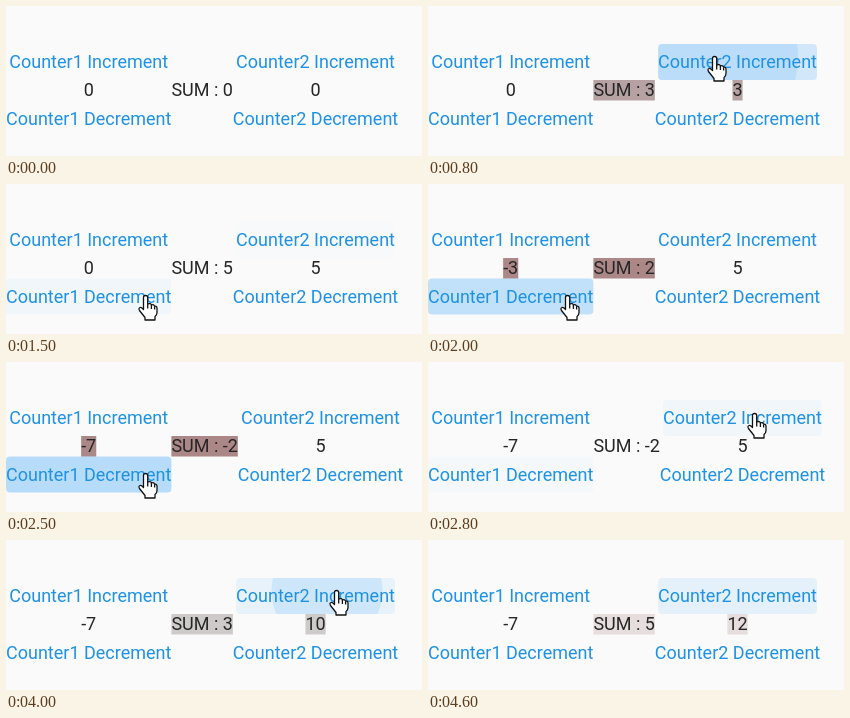
An HTML page with a canvas for the animation above (4.7 s loop, 416 by 150 pixels).

```html
<!DOCTYPE html>
<html lang="en">
<head>
<meta charset="utf-8">
<title>Two counters and their sum</title>
<style>
  html, body { margin: 0; width: 100%; height: 100%; overflow: hidden; background: #fafafa; }
  canvas { display: block; }
</style>
</head>
<body>
<canvas id="stage" width="416" height="150"></canvas>
<script>
const ctx = document.getElementById('stage').getContext('2d');
const LOOP = 4700, STEP = 100;
const BLUE = '33,150,243';
const ROW = { inc: 38, num: 74, dec: 94.5 };
const BTN_H = 36;

// Click times per button
const clicks = {
  dec1: [1550, 1700, 1850, 2020, 2130, 2240, 2350],
  inc2: [400, 550, 700, 880, 1030, 2880, 3050, 3320, 3600, 3950, 4090, 4230]
};

// Pointer tip: time, x, y
const path = [
  [100, 300, 6], [200, 310, 85], [300, 287, 51], [1000, 287, 51],
  [1100, 170, 80], [1200, 52, 94], [1300, 90, 113], [1400, 140, 112],
  [2500, 140, 112], [2600, 230, 85], [2700, 322, 54], [2800, 327, 52],
  [3900, 331, 51], [4700, 331, 51]
];
const SHOW = 100, HIDE = 4500;

const hand = new Path2D('M-2.5 1.5 Q-2.5 -.5 -.5 -.5 Q1.7 -.5 1.7 1.5 V8 ' +
  'Q4.8 6.8 5.4 9 Q8 8 8.6 10.2 Q11 9.6 11 12.3 V16.5 Q11 19 9 20.5 V24 H-1 V21.5 ' +
  'L-6.5 14.5 Q-7.8 12.2 -6 11.5 Q-4.7 11.1 -2.5 13.5 Z');
const creases = new Path2D('M1.7 8 V12.5 M5.4 9 V13 M8.6 10.2 V13.5');
const arrow = new Path2D('M0 0 V17 L4 13.2 L6.8 19.5 L9.6 18.2 L6.9 12.2 H12.3 Z');

function pointer(t) {
  if (t < SHOW) return null;
  const i = path.findIndex(p => p[0] > t);
  const [t0, x0, y0] = path[i - 1], [t1, x1, y1] = path[i];
  const k = (t - t0) / (t1 - t0);
  return { x: x0 + (x1 - x0) * k, y: y0 + (y1 - y0) * k };
}

const past = (list, t) => list.filter(c => c <= t);

function label(text, x, y, color) {
  ctx.fillStyle = color;
  ctx.fillText(text, x, y);
}

function flash(x, w, list, t) {
  const age = t - Math.max(-LOOP, ...past(list, t));
  if (age >= 400) return;
  const alpha = 0.5 * Math.sin(Math.PI * age / 400);
  const red = Math.min(80, 0.58 * age);
  ctx.fillStyle = `rgba(${red},0,0,${alpha})`;
  ctx.fillRect(x, ROW.num, w, 20.5);
}

function number(text, x, list, t) {
  const w = ctx.measureText(text).width;
  flash(x, w, list, t);
  label(text, x, 90, '#262626');
}

function button(text, mid, y, mouse, list, t) {
  const w = ctx.measureText(text).width, x = mid - w / 2;
  const over = mouse && mouse.x > x && mouse.x < x + w && mouse.y > y && mouse.y < y + BTN_H;
  ctx.save();
  ctx.beginPath();
  ctx.roundRect(x, y, w, BTN_H, 4);
  ctx.clip();
  if (over) {
    ctx.fillStyle = `rgba(${BLUE},.04)`;
    ctx.fillRect(x, y, w, BTN_H);
  }
  for (const c of past(list, t)) {
    const age = t - c;
    if (age >= 500) continue;
    const at = pointer(c);
    ctx.fillStyle = `rgba(${BLUE},${0.13 * Math.min(1, (500 - age) / 300)})`;
    ctx.beginPath();
    ctx.arc(at.x - 10, at.y, 18 + 0.75 * age, 0, 7);
    ctx.fill();
  }
  ctx.restore();
  label(text, x, y + 24, '#1f92e4');
  return over;
}

function cursor(mouse, over) {
  ctx.save();
  ctx.translate(mouse.x, mouse.y);
  ctx.lineWidth = 1.3;
  ctx.lineJoin = 'round';
  ctx.strokeStyle = '#111';
  ctx.fillStyle = '#fff';
  const shape = over ? hand : arrow;
  ctx.fill(shape);
  ctx.stroke(shape);
  if (over) ctx.stroke(creases);
  ctx.restore();
}

function draw(t) {
  ctx.fillStyle = '#fafafa';
  ctx.fillRect(0, 0, 416, 150);
  ctx.font = '18px Roboto, sans-serif';

  const a = -past(clicks.dec1, t).length, b = past(clicks.inc2, t).length;
  const sum = 'SUM : ' + (a + b);
  const colW = ctx.measureText('Counter1 Decrement').width;
  const mid1 = colW / 2;
  const mid2 = colW + ctx.measureText(sum).width + colW / 2;
  const mouse = pointer(t);
  const centered = (n, mid) => mid - ctx.measureText(n).width / 2;

  number(String(a), centered(a, mid1), clicks.dec1, t);
  number(sum, colW, [...clicks.dec1, ...clicks.inc2], t);
  number(String(b), centered(b, mid2), clicks.inc2, t);

  const over = [
    button('Counter1 Increment', mid1, ROW.inc, mouse, [], t),
    button('Counter1 Decrement', mid1, ROW.dec, mouse, clicks.dec1, t),
    button('Counter2 Increment', mid2, ROW.inc, mouse, clicks.inc2, t),
    button('Counter2 Decrement', mid2, ROW.dec, mouse, [], t)
  ].some(Boolean);

  if (mouse && t < HIDE) cursor(mouse, over);
}

const start = performance.now();
function tick() {
  const t = (performance.now() - start) % LOOP;
  draw(Math.floor(t / STEP) * STEP);
  requestAnimationFrame(tick);
}
tick();
</script>
</body>
</html>
```
